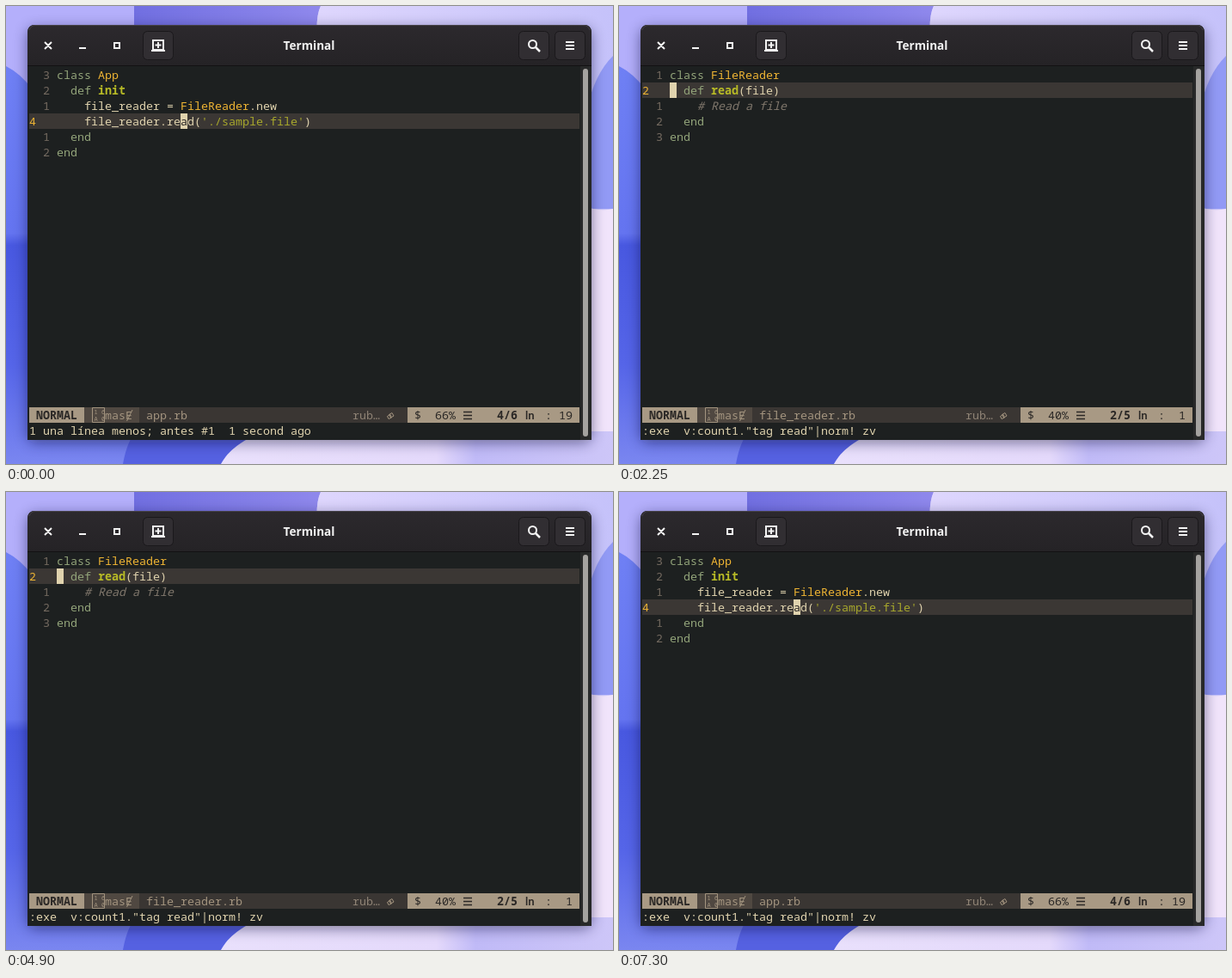
An HTML page for the animation above (7350 ms loop, 706 px wide and 533 px high).

```html
<!DOCTYPE html>
<html lang="en">
<head>
<meta charset="utf-8">
<title>Terminal</title>
<style>
html, body { margin: 0; width: 100%; height: 100%; overflow: hidden; background: #c9c6fb; }
svg { display: block; width: 100vw; height: 100vh; }
text { font: 13.333px "Noto Sans Mono", monospace; white-space: pre; fill: #e0d3ae; }
.title { font: bold 13.6px "Open Sans", sans-serif; fill: #f4f4f4; text-anchor: middle; }
.num { fill: #746a60; }
.now, .type { fill: #eeb433; }
.key { fill: #93a47a; }
.func { fill: #b8bb26; font-weight: bold; }
.str { fill: #a8a82c; }
.note { fill: #7f766b; font-style: italic; }
.dim { fill: #a3947f; }
.mute { fill: #8f8375; }
.dark { fill: #2b2826; }
.bold { font-weight: bold; }
.tiny { font-size: 7px; }
.ln { font: bold 13px Lato, sans-serif; }
.icon { fill: none; stroke: #f4f4f4; stroke-width: 2; }
.button { fill: #312e32; stroke: #1a181b; }
</style>
</head>
<body>
<svg viewBox="0 0 706 533" preserveAspectRatio="none">
  <defs>
    <linearGradient id="left" x2="0" y2="1">
      <stop offset="0" stop-color="#6f80f4"/><stop offset=".42" stop-color="#6474f0"/>
      <stop offset=".45" stop-color="#4858e0"/><stop offset=".75" stop-color="#5565e8"/>
      <stop offset="1" stop-color="#7a86f0"/>
    </linearGradient>
    <linearGradient id="top"><stop stop-color="#716fe1"/><stop offset="1" stop-color="#8f88ec"/></linearGradient>
    <linearGradient id="bottom">
      <stop stop-color="#e9e0fc"/><stop offset=".55" stop-color="#e4d9fb"/>
      <stop offset=".65" stop-color="#c0baf7"/><stop offset="1" stop-color="#cdc6f8"/>
    </linearGradient>
    <linearGradient id="sky"><stop stop-color="#ded6fd"/><stop offset="1" stop-color="#c5c2fa"/></linearGradient>
    <linearGradient id="bar" x2="0" y2="1"><stop stop-color="#2c292d"/><stop offset="1" stop-color="#252326"/></linearGradient>
    <filter id="blur" x="-10%" y="-10%" width="120%" height="120%"><feGaussianBlur stdDeviation="8"/></filter>
  </defs>

  <!-- wallpaper -->
  <path fill="#b4affb" d="M0 0H149V120H0z"/>
  <path fill="url(#top)" d="M149 0H366Q360 12 362 40H149z"/>
  <path fill="url(#sky)" d="M366 0H706V260H362V40Q360 12 366 0z"/>
  <path fill="url(#left)" d="M0 70Q16 78 30 96V500H300L250 533H0z"/>
  <path fill="#5561e1" d="M150 495H300Q262 510 250 533H136Q140 510 150 495z"/>
  <path fill="#929af5" d="M706 58Q684 80 676 120V236H706z"/>
  <path fill="#f1e4fb" d="M670 232Q690 240 706 236V533H670z"/>
  <path fill="url(#bottom)" d="M300 495H706V533H250Q262 510 300 495z"/>

  <!-- window -->
  <rect x="25" y="26" width="656" height="482" rx="9" fill="#101030" opacity=".5" filter="url(#blur)"/>
  <path fill="#1d2020" d="M25 505V31Q25 22 34 22H672Q681 22 681 31V505z"/>
  <path fill="url(#bar)" d="M25 69V31Q25 22 34 22H672Q681 22 681 31V69z"/>
  <path stroke="#454147" fill="none" d="M27 28Q29 22.5 34 22.5H672Q677 22.5 679 28"/>
  <path fill="#121112" d="M25 69H681V70H25z"/>
  <path fill="#282929" d="M668 70H681V505H668z"/>
  <rect x="671" y="73" width="6" height="428" rx="3" fill="#a5a3a0"/>
  <text class="title" x="352.5" y="51">Terminal</text>
  <g class="button">
    <rect x="159.500" y="29.500" width="35" height="33" rx="5"/>
    <rect x="596.500" y="29.500" width="35" height="33" rx="5"/>
    <rect x="638.500" y="29.500" width="35" height="33" rx="5"/>
  </g>
  <g class="icon">
    <path d="M45 42L53 50M53 42L45 50M85 49H93M126 43H132V49H126z"/>
    <path d="M171 40H183V51H171zM177 42V49M173.500 45.500H180.500M169 52H185"/>
    <circle cx="612.500" cy="44.500" r="4.500"/><path d="M616 48L621 53" stroke-width="2.500"/>
    <path d="M651 42H661M651 46H661M651 50H661"/>
  </g>

  <!-- status line -->
  <path fill="#a89984" d="M27 467H91V485H27zM467 467H667V485H467z"/>
  <path fill="#504841" d="M91 467H155V485H91z"/>
  <path fill="#3a3633" d="M155 467H467V485H155z"/>
  <path fill="none" stroke="#a3947f" d="M100.500 467.500H114.500V484.500H100.500zM140.500 483L147 470"/>
  <text class="dim tiny" x="102.500" y="475">1 6</text>
  <text class="dim tiny" x="102.500" y="483">A 0</text>
  <g fill="none" stroke="#a3947f"><path d="M445.500 475.500L449 473.500L451 477L447.500 479zM443.500 477.500L447 475.500L448.500 479L445 480.500z"/></g>
  <path stroke="#2b2826" stroke-width="1.300" d="M532 472.500H542M532 476.500H542M532 480.500H542"/>
  <text class="dark ln" x="604" y="481">ln</text>

  <g id="common"></g>
  <g id="app"></g>
  <g id="reader"></g>
  <g id="command"></g>
</svg>
<script>
const LOOP = 7350, OPEN = 2250, BACK = 5950;
const $ = id => document.getElementById(id);

// Terminal cells are 8 by 18 pixels.
const left = col => 27 + col * 8;
const text = (row, col, style, value) =>
  `<text class="${style}" x="${left(col)}" y="${85 + row * 18}">${value}</text>`;
const block = (row, col, count, color) =>
  `<rect x="${left(col)}" y="${71 + row * 18}" width="${count * 8}" height="18" fill="${color}"/>`;

// Each line is a list of [column, style, value] pieces.
function buffer(lines, current, cursor, file, percent, place, column) {
  let out = block(current, 0, 80, "#3b3734") + block(current, cursor, 1, "#e0d3ae");
  lines.forEach((pieces, row) => {
    const gap = Math.abs(row - current);
    out += gap ? text(row, 2, "num", gap) : text(row, 0, "now", row + 1);
    for (const piece of pieces) out += text(row, ...piece);
  });
  return out + text(22, 17, "dim", file) + text(22, 59, "dark", percent) +
    text(22, 68, "dark bold", place) + text(22, 79 - column.length, "dark", column);
}

$("common").innerHTML = text(22, 1, "dark bold", "NORMAL") + text(22, 11, "dim", "masE") +
  text(22, 47, "mute", "rub…") + text(22, 56, "dark", "$") + text(22, 75, "dark", ":");

$("app").innerHTML = buffer([
  [[4, "key", "class"], [10, "type", "App"]],
  [[6, "key", "def"], [10, "func", "init"]],
  [[8, "", "file_reader ="], [22, "type", "FileReader"], [32, "", ".new"]],
  [[8, "", "file_reader.re"], [22, "dark", "a"], [23, "", "d("],
    [25, "str", "'./sample.file'"], [40, "", ")"]],
  [[6, "key", "end"]],
  [[4, "key", "end"]]
], 3, 22, "app.rb", "66%", "4/6", "19");

$("reader").innerHTML = buffer([
  [[4, "key", "class"], [10, "type", "FileReader"]],
  [[6, "key", "def"], [10, "func", "read"], [14, "", "(file)"]],
  [[8, "note", "# Read a file"]],
  [[6, "key", "end"]],
  [[4, "key", "end"]]
], 1, 4, "file_reader.rb", "40%", "2/5", "1");

const before = text(23, 0, "", "1 una línea menos; antes #1  1 second ago");
const after = text(23, 0, "", ':exe  v:count1."tag read"|norm! zv');
let shown;

function draw() {
  const time = performance.now() % LOOP;
  const phase = time < OPEN ? 0 : time < BACK ? 1 : 2;
  if (phase !== shown) {
    $("app").style.display = phase === 1 ? "none" : "";
    $("reader").style.display = phase === 1 ? "" : "none";
    $("command").innerHTML = phase ? after : before;
    shown = phase;
  }
  requestAnimationFrame(draw);
}
draw();
</script>
</body>
</html>
```
